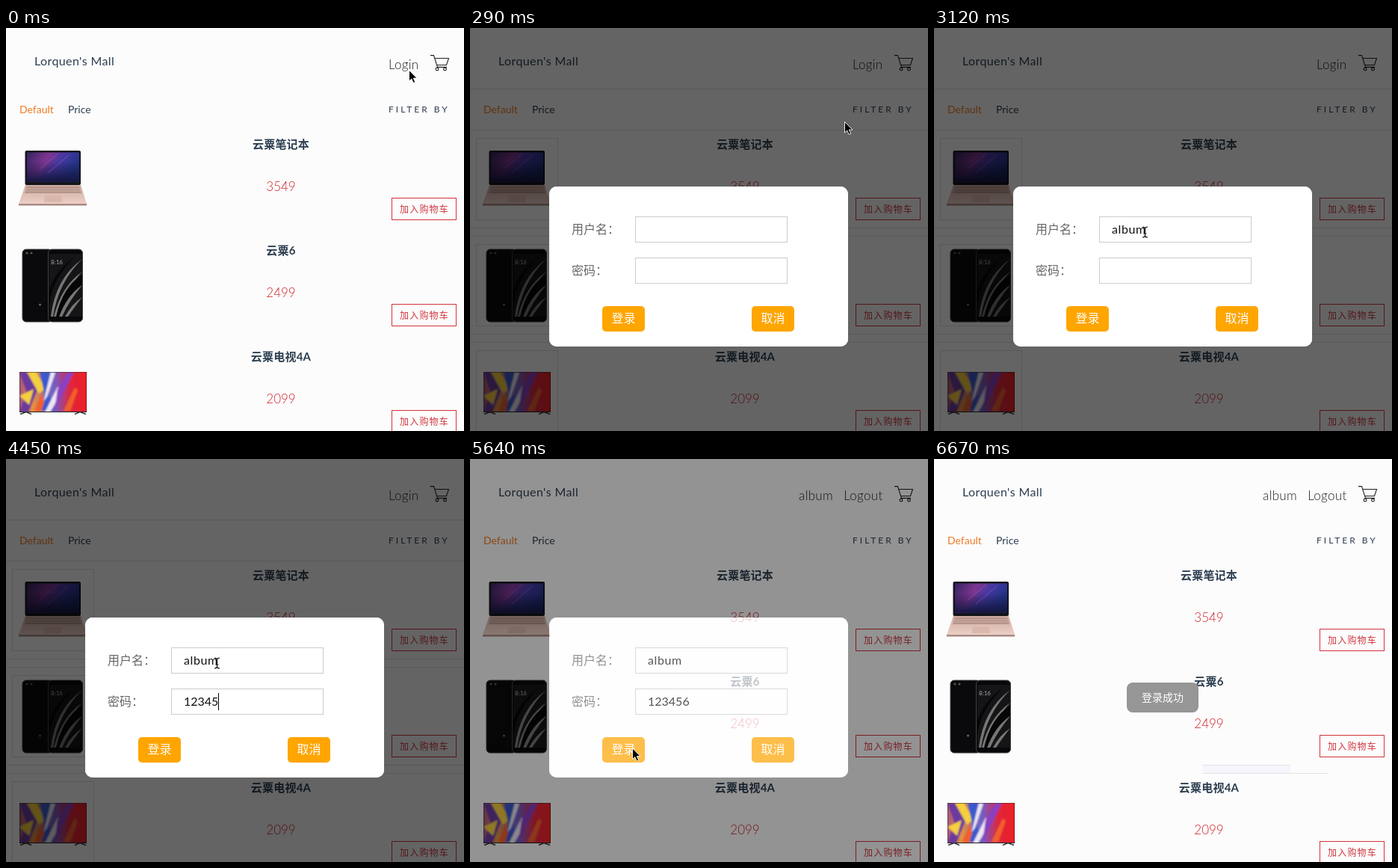
Write an HTML page that moves like this. It is 613x539 px and loops after 6820 ms.

```html
<!DOCTYPE html>
<html lang="zh-CN">
<head>
<meta charset="utf-8">
<title>Mall login</title>
<style>
  html, body { margin: 0; width: 100%; height: 100%; overflow: hidden; background: #fcfcfc; }
  svg { display: block; width: 613px; height: 539px; }
  text { font: 16px Lato, "Noto Sans CJK SC", "Noto Sans CJK", sans-serif; fill: #2c3e50; white-space: pre; }
  .mid { text-anchor: middle; }
  .nav { font-size: 17px; font-weight: 300; letter-spacing: .3px; fill: #222; text-anchor: end; }
  .sort { font-size: 14px; }
  .name { font-size: 15px; font-weight: 700; letter-spacing: .2px; }
  .price { font-size: 17px; font-weight: 300; fill: #d0242e; }
  .add { font-size: 12px; font-weight: 500; letter-spacing: 1.2px; fill: #d0343c; }
  .label { fill: #666; }
  .typed { fill: #111; letter-spacing: .6px; }
  .white { fill: #fff; }
  .field { fill: #fff; stroke: #ccc; }
  #toast { transform-origin: 306px 319px; }
  #toast text { font-size: 14px; }
</style>
</head>
<body>
<svg viewBox="0 0 613 539">
  <defs>
    <linearGradient id="sky" x2="1" y2=".35">
      <stop stop-color="#33245f"/><stop offset=".4" stop-color="#7d3590"/>
      <stop offset=".65" stop-color="#4638a4"/><stop offset="1" stop-color="#223386"/>
    </linearGradient>
    <linearGradient id="dusk" x2="0" y2="1">
      <stop offset=".3" stop-color="#14163f" stop-opacity="0"/><stop offset="1" stop-color="#14163f"/>
    </linearGradient>
    <linearGradient id="rose" x2="0" y2="1">
      <stop stop-color="#cfab9f"/><stop offset="1" stop-color="#eccfc5"/>
    </linearGradient>
    <linearGradient id="paint">
      <stop stop-color="#8c3a9c"/><stop offset=".25" stop-color="#e8923a"/>
      <stop offset=".5" stop-color="#6b60d0"/><stop offset=".72" stop-color="#e0263c"/>
      <stop offset="1" stop-color="#f01c1c"/>
    </linearGradient>
    <filter id="soft"><feGaussianBlur stdDeviation="1.2"/></filter>
    <clipPath id="tvScreen"><path d="M18.500 460.500h89v52.500h-89z"/></clipPath>
    <clipPath id="phoneScreen"><path d="M58 302h44v84H58z"/></clipPath>
  </defs>

  <rect width="613" height="539" fill="#fcfcfc"/>
  <g id="bands">
    <path fill="#edf1f4" d="M0 0h613v11H0zM0 267h106v12H0zM506 267h107v12H506zM0 409h106v12H0zM506 409h107v12H506z"/>
    <path fill="#e9e9e9" d="M0 81h613v56H0z"/>
  </g>
  <path id="lines" stroke="#e0e0e0" d="M0 81.5h613M0 136.5h613M0 267.5h613M0 278.5h613M0 409.5h613M0 420.5h613"/>
  <path id="boxes" fill="none" stroke="#dcdcdc" d="M8.500 147.500h109v109h-109zM8.500 289.500h109v109h-109zM8.500 431.500h109v109h-109z"/>
  <g id="strip">
    <path fill="#f5f5fb" d="M360 409h117v11H360z"/>
    <path stroke="#e2e2e6" d="M360 409.500h117M360 420.500h168"/>
  </g>

  <text x="38" y="50" letter-spacing=".4">Lorquen's Mall</text>
  <text class="nav" id="account" x="486" y="55">album</text>
  <text class="nav" id="session" x="552.500" y="55"></text>
  <g fill="none" stroke="#222" stroke-width="1.100">
    <path d="M568 36.600h4.500l5 15.800h12.500M573.500 40.500h19l-3 9h-13"/>
    <circle cx="577" cy="55" r="1.900"/><circle cx="587.500" cy="55" r="1.900"/>
  </g>
  <text class="sort" x="18" y="114" style="fill:#ee7a23">Default</text>
  <text class="sort" x="83" y="114">Price</text>
  <text x="512" y="113" style="font-size:12px;letter-spacing:3px">FILTER BY</text>

  <g id="laptop">
    <rect x="25.500" y="164" width="74.500" height="46" rx="2" fill="#15151c"/>
    <path fill="url(#sky)" d="M28 166.500h70v39H28z"/>
    <path fill="url(#dusk)" d="M28 166.500h70v39H28z"/>
    <path fill="none" stroke="#c060a8" stroke-opacity=".5" d="M46 188L70 168M56 194L84 170"/>
    <path fill="url(#rose)" d="M26 210h74l8 25H17z"/>
    <path fill="#b4948b" d="M28 212h70l3 9H25z"/>
    <path stroke="#d9bbb1" stroke-width=".700" d="M27 215h72M26 218h74"/>
    <path fill="#d9b7ad" d="M52 224h22l1 9H51z"/>
    <path fill="#a98a82" d="M17 235h91v2.500H17z"/>
  </g>
  <g id="phone">
    <rect x="22" y="296" width="40" height="97" rx="5" fill="#0a0a0c" stroke="#3c3c40"/>
    <circle cx="28" cy="301" r="1.600" fill="#555"/><circle cx="34" cy="301" r="1.600" fill="#555"/>
    <circle cx="45.500" cy="370" r="1.500" fill="#666"/>
    <rect x="56.500" y="296" width="46" height="97" rx="5" fill="#08080a" stroke="#444448"/>
    <g clip-path="url(#phoneScreen)">
      <path fill="#151517" d="M58 302h44v84H58z"/>
      <path fill="#777" d="M60 386Q66 335 102 309Q70 340 63 386zM64 386Q74 345 102 326Q79 351 69 386zM71 386Q82 357 102 344Q85 364 75 386zM79 386Q88 369 102 360Q91 374 83 386z"/>
      <path fill="#060607" d="M58 370Q62 335 92 306Q66 325 58 350zM67 386Q76 346 102 330V342Q80 360 71 386z"/>
    </g>
    <text x="60" y="316" style="font-size:8px;fill:#aaa">8:16</text>
  </g>
  <g id="tv">
    <path fill="#222" d="M18 460h90v54H18z"/>
    <g clip-path="url(#tvScreen)"><g filter="url(#soft)">
      <path fill="url(#paint)" d="M10 452h106v70H10z"/>
      <path fill="#6a3a9c" d="M18 460h10l14 24-12 30H18l9-28z"/>
      <path fill="#f5cf3c" d="M28 460h12l13 22-9 7zM18 492l19-9-6 21z"/>
      <path fill="#3a58cc" d="M45 460h17l-6 24 8 28H48l3-25z"/>
      <path fill="#efe6f2" d="M60 460l6 1-11 32-5 7zM69 480l8 3-18 31h-7z"/>
      <path fill="#8a3fc0" d="M82 460h9L65 512l4-29z"/>
      <path fill="#f2602c" d="M38 512l10-25 3 14-5 13zM77 512l15-31 4 3-10 28z"/>
    </g></g>
    <path fill="none" stroke="#333" stroke-width="1.500" d="M19 516.500l8-3 7 3M92 516.500l7-3 8 3"/>
  </g>
  <g id="products"></g>

  <path id="shade" fill-rule="evenodd"/>
  <g id="dialog">
    <rect x="106" y="212" width="400" height="214" rx="10" fill="#fff"/>
    <text class="label" x="136" y="275">用户名：</text>
    <text class="label" x="136" y="330">密码：</text>
    <rect class="field" x="221.500" y="252.500" width="203" height="34"/>
    <rect class="field" x="221.500" y="307.500" width="203" height="34"/>
    <text class="typed" id="user" x="238" y="275"></text>
    <text class="typed" id="pass" x="238" y="330" style="letter-spacing:0"></text>
    <rect id="caret" width="1" height="23"/>
    <rect x="177" y="372" width="57" height="34" rx="5" fill="#ffa500"/>
    <rect x="377" y="372" width="57" height="34" rx="5" fill="#ffa500"/>
    <text class="mid white" x="205.500" y="394">登录</text>
    <text class="mid white" x="405.500" y="394">取消</text>
  </g>
  <g id="toast">
    <rect x="258" y="299" width="96" height="40" rx="8" fill="#969696"/>
    <text class="mid white" x="306" y="324">登录成功</text>
  </g>
  <g id="pointer">
    <path id="arrow" d="M0 0v14.500l3.300-3 2.400 5.400 2.500-1.100-2.400-5.200h4.700z" stroke="#fff" stroke-width=".900"/>
    <path id="beam" fill="none" stroke="#111" stroke-width="1.200" d="M-3.500-6.500q3 0 3.500 2 .5-2 3.500-2M0-5V6M-3.500 7.500q3 0 3.500-2 .5 2 3.500 2M-2 2.500h4"/>
  </g>
</svg>
<script>
const LOOP = 6820, TICKS = 46;
const el = id => document.getElementById(id);
const show = (id, on) => el(id).style.opacity = +on;

const items = [["云粟笔记本", 3549], ["云粟6", 2499], ["云粟电视4A", 2099]];
el("products").innerHTML = items.map(([name, price], i) => `
  <g transform="translate(0 ${i * 142})">
    <text class="mid name" x="368" y="161">${name}</text>
    <text class="mid price" x="368" y="218">${price}</text>
    <rect x="516.5" y="227.5" width="86" height="29" fill="none" stroke="#d0343c"/>
    <text class="mid add" x="560" y="247">加入购物车</text>
  </g>`).join("");

// Stops are [tick, value...]
const held = (stops, n) => stops.filter(s => s[0] <= n).pop()[1];
const glide = (stops, n) => {
  const i = stops.findIndex(s => s[0] > n);
  if (i < 0) return stops.at(-1).slice(1);
  const a = stops[i - 1], b = stops[i], k = (n - a[0]) / (b[0] - a[0]);
  return [1, 2].map(j => a[j] + (b[j] - a[j]) * k);
};

const fadeStops = [[0, 0], [1, .5], [2, 1], [38, .7], [39, .12], [40, 0]];
const path = [[0, 539.5, 56.5], [1, 539.5, 56.5], [2, 501.500, 125.500], [5, 360, 265], [8, 282.5, 334],
  [10, 282.5, 272.5], [33, 282.5, 272.5], [37, 217.5, 387], [40, 217.5, 387], [41, 235, 369],
  [43, 465, 385], [44, 517, 504]];
const passTicks = [24, 25, 26, 28, 30, 32];

const page = "M0 0h613v539H0z";
const hole = "M116 212h380a10 10 0 0 1 10 10v194a10 10 0 0 1-10 10H116a10 10 0 0 1-10-10V222a10 10 0 0 1 10-10z";

function draw(n) {
  const loggedIn = n >= 38;
  show("lines", n > 0 && !loggedIn);
  show("boxes", n > 0 && !loggedIn || n === 39);
  show("bands", n === 39);
  show("strip", n >= 43);
  show("account", loggedIn);
  el("session").textContent = loggedIn ? "Logout" : "Login";

  const fade = held(fadeStops, n);
  el("shade").setAttribute("d", n < 39 ? page + hole : page);
  show("shade", .6 * fade);
  show("dialog", fade);

  el("user").textContent = "album".slice(0, n < 17 ? Math.max(0, n - 13) : 5);
  el("pass").textContent = "123456".slice(0, passTicks.filter(t => t <= n).length);
  const inPass = n >= 18, field = el(inPass ? "pass" : "user");
  const width = field.textContent ? field.getComputedTextLength() : 0;
  el("caret").setAttribute("x", Math.round(238 + width));
  el("caret").setAttribute("y", inPass ? 313 : 258);
  show("caret", n >= 11 && n < 21 || n >= 24 && n < 37);

  show("toast", held([[0, 0], [39, .7], [40, .95], [41, 1]], n));
  el("toast").style.transform = `scale(${held([[0, .9], [40, .98], [41, 1]], n)})`;

  const [x, y] = glide(path, n);
  const overField = n > 1 && !loggedIn && x > 221 && x < 425 && (y > 252 && y < 287 || y > 307 && y < 342);
  el("pointer").setAttribute("transform", `translate(${x} ${y})`);
  show("pointer", n < 45);
  show("arrow", !overField);
  show("beam", overField);
}

function loop() {
  const t = performance.now() % LOOP;
  draw(Math.min(TICKS - 1, Math.floor((t + 8.3) * TICKS / LOOP)));
  requestAnimationFrame(loop);
}
loop();
</script>
</body>
</html>
```
